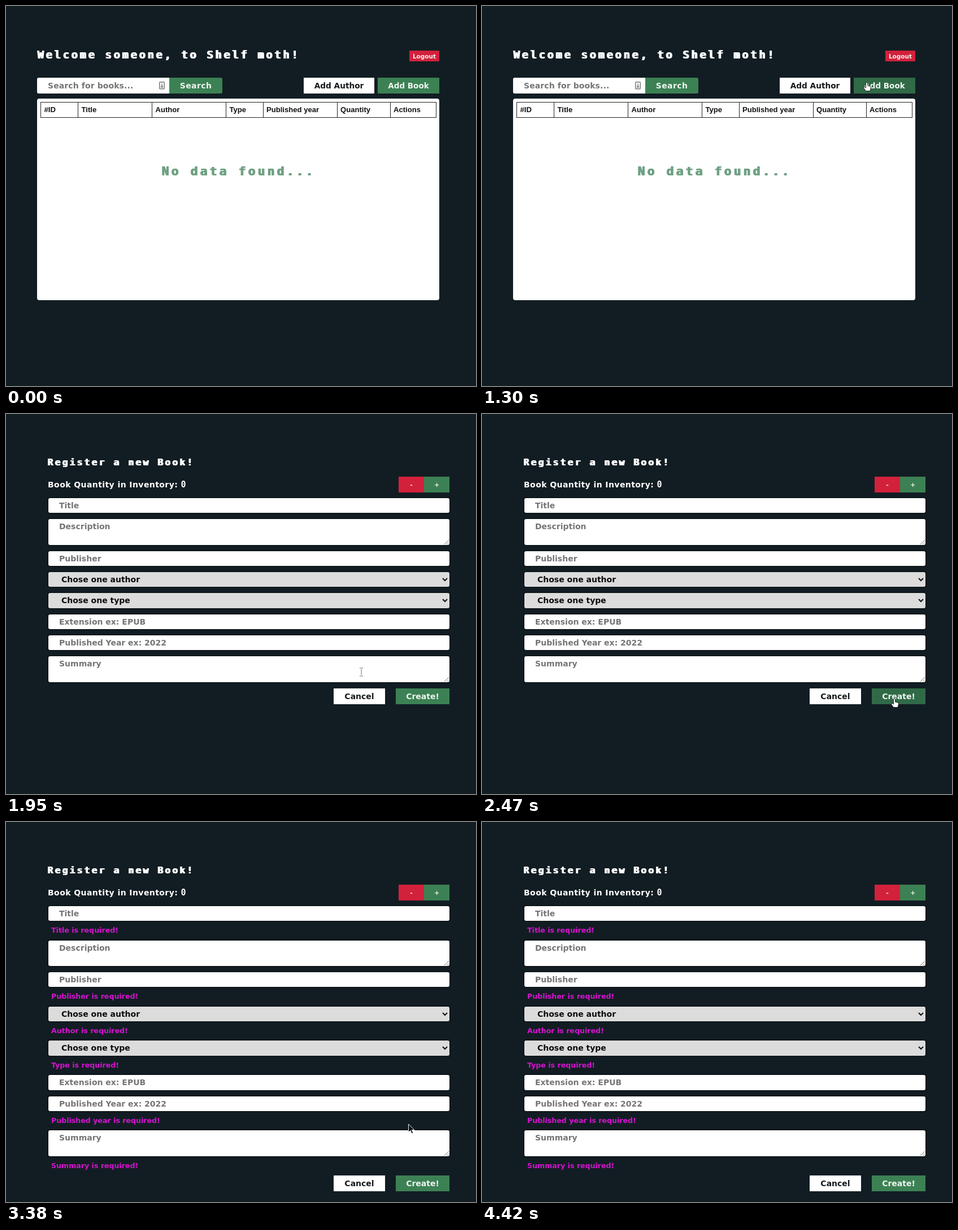
An HTML page that plays this animation: 832 by 673 pixels, repeating every 4680 ms.

```html
<!DOCTYPE html>
<html lang="en">
<head>
<meta charset="utf-8">
<title>Book registration</title>
<style>
  * { box-sizing: border-box; }
  html, body { margin: 0; width: 100%; height: 100%; overflow: hidden; background: #121d23; }
  body { font: bold 14px "DejaVu Sans", sans-serif; color: #fff; white-space: nowrap; }
  #stage { position: relative; width: 832px; height: 673px; overflow: hidden; }
  [hidden] { display: none !important; }
  .abs, .btn.abs { position: absolute; }
  .view { position: absolute; inset: 0; }

  .pixel {
    position: absolute; line-height: 24px; letter-spacing: .2em;
    font-family: "DejaVu Sans Mono", monospace; text-shadow: 1px 0, 1.6px 0;
  }
  .btn {
    display: flex; align-items: center; justify-content: center;
    height: 28px; background: #3c8154; color: #eef5ef;
  }
  .btn.white { background: #fff; color: #15191c; }
  .btn.red { background: #d3213c; }
  .btn.hover { background: #306a47; }

  #search {
    left: 55px; top: 127px; width: 234px; height: 28px; padding-left: 19px; line-height: 28px;
    background: #fff; color: #757575; border-radius: 3px 0 0 3px; letter-spacing: .1px;
  }
  #panel { left: 55px; top: 164px; width: 712px; height: 357px; background: #fff; border-radius: 4px; }
  #head {
    left: 61px; top: 170px; height: 28px; display: flex; border: solid #222; border-width: 1px 0 1px 1px;
    font: bold 13.1px/26px "Liberation Sans", Arial, sans-serif; color: #111;
  }
  #head span { padding-left: 5.5px; border-right: 1px solid #222; }

  #rows { left: 75px; top: 149px; width: 710px; }
  .row {
    position: relative; width: 709.5px; height: 26.4px; margin-bottom: 10.95px;
    padding-left: 19px; line-height: 26.4px;
    background: #fff; color: #757575; border-radius: 3px; box-shadow: 0 0 2px 1px #090f12;
  }
  .area { height: 45.4px; }
  .pick { background: #dcdcdc; color: #0c0c0c; padding-left: 23px; }
  .row svg { position: absolute; fill: none; stroke: #111; }
  .err { height: 23.4px; padding-left: 5px; font-size: 12.6px; line-height: 12px; color: #d512d0; }
  #foot { position: relative; display: flex; justify-content: flex-end; gap: 19px; z-index: 2; }
  #cancel { width: 91px; }
  #create { width: 95px; }
  #create.loading { width: 65px; }
  .load { width: 28px; height: 10px; background: linear-gradient(#6f9fc2, #6f9fc2) no-repeat #111d23; background-size: 9px 10px; }
  #veil { left: 75px; top: 80px; width: 748px; height: 478px; background: rgba(8, 62, 36, .17); }
  #cursor { left: 0; top: 0; overflow: visible; z-index: 3; }
</style>
</head>
<body>
<div id="stage">
  <div class="view" id="list">
    <div class="pixel" style="left:55px;top:75px;font-size:18.7px">Welcome someone, to Shelf moth!</div>
    <div class="btn red abs" style="left:714px;top:79px;width:53px;height:19px;font-size:10.5px;border-radius:1px">Logout</div>
    <div class="abs" id="search">Search for books...
      <svg class="abs" style="left:216px;top:7px" width="10" height="14" fill="none" stroke="#777">
        <rect x=".75" y=".75" width="8.5" height="12" rx="1" stroke-width="1.5"/>
        <path d="M5 3.5v3M3 8h4M3 10h4" stroke-width="1.5"/>
      </svg>
    </div>
    <div class="btn abs" style="left:289px;top:127px;width:94px;letter-spacing:.4px;border-radius:0 3px 3px 0">Search</div>
    <div class="btn white abs" style="left:527px;top:127px;width:125px;font-size:13.7px">Add Author</div>
    <div class="btn abs" id="add" style="left:658px;top:127px;width:109px;font-size:13.5px">Add Book</div>
    <div class="abs" id="panel"></div>
    <div class="abs" id="head"></div>
    <div class="pixel" style="left:275px;top:281px;font-size:21.2px;color:#70a183">No data found...</div>
  </div>

  <div class="view" id="form" hidden>
    <div class="pixel" style="left:73px;top:74px;font-size:16.2px">Register a new Book!</div>
    <div class="abs" style="left:74px;top:116px;line-height:19px;letter-spacing:.42px">Book Quantity in Inventory: <span style="font-family:'DejaVu Sans Mono',monospace;font-size:15px">0</span></div>
    <div class="btn red abs" style="left:695px;top:111px;width:45px;font-size:11px">-</div>
    <div class="btn abs" style="left:740px;top:111px;width:45px;font-size:11px">+</div>
    <div class="abs" id="rows"></div>
    <div class="abs load busy" style="left:434px;top:315px"></div>
    <div class="abs busy" id="veil"></div>
  </div>

  <svg class="abs" id="cursor" width="20" height="24">
    <path id="arrow" d="M0 0V14.5L3.4 11.4 5.8 16.8 8.2 15.7 5.8 10.5H10.4Z" fill="#111" stroke="#eee"/>
    <path id="hand" d="M-1.5 1Q0-1 1.5 1V6L6 7Q8 7.5 7.5 10L6 15.5H-1.5L-5.5 10Q-6 8-4 8.3L-1.5 10Z" fill="#fff" stroke="#222"/>
    <path id="beam" d="M-3-7.5H-1L0-6.5 1-7.5H3M-3 7.5H-1L0 6.5 1 7.5H3M0-6.5V6.5" fill="none" stroke="#777"/>
  </svg>
</div>

<script>
const $ = id => document.getElementById(id);
const TICK = 130, LOOP = 4680;

const columns = [["#ID", 66], ["Title", 131], ["Author", 131], ["Type", 65.5], ["Published year", 131], ["Quantity", 94], ["Actions", 81.5]];
$("head").innerHTML = columns.map(([name, w]) => `<span style="width:${w}px">${name}</span>`).join("");

// kind, label, required name
const fields = [
  ["", "Title", "Title"],
  ["area", "Description"],
  ["", "Publisher", "Publisher"],
  ["pick", "Chose one author", "Author"],
  ["pick", "Chose one type", "Type"],
  ["", "Extension ex: EPUB"],
  ["", "Published Year ex: 2022", "Published year"],
  ["area", "Summary", "Summary"]
];
const extras = {
  area: `<svg style="right:1px;bottom:1px;stroke:#777" width="8" height="8"><path d="M0 8 8 0M4.5 8 8 4.5"/></svg>`,
  pick: `<svg style="right:3px;top:10px" width="10" height="7"><path d="M1 1 5 5 9 1" stroke-width="2"/></svg>`
};
const stepper = `<svg id="stepper" style="left:677px;top:5px" width="14" height="17">
  <rect width="14" height="17" fill="#eee" stroke="none"/>
  <path d="M3.5 7 7 3.5 10.5 7ZM3.5 10 7 13.5 10.5 10Z" fill="#444" stroke="none"/></svg>`;
$("rows").innerHTML = fields.map(([kind, label, need]) =>
  `<div class="row ${kind}">${label}${extras[kind] || ""}${need === "Published year" ? stepper : ""}</div>` +
  (need ? `<div class="err">${need} is required!</div>` : "")
).join("") +
  `<div id="foot"><div class="btn white" id="cancel">Cancel</div><div class="btn" id="create">
  <span id="label">Create!</span><div class="load busy"></div></div></div>`;

// tick, cursor shape, x, y
const path = [
  [2, "arrow", 600, 642], [4, "arrow", 640, 440], [6, "arrow", 668, 215],
  [7, "hand", 677, 145], [9, "hand", 681, 135], [10, "hand", 681, 135], [11, "arrow", 674, 139],
  [13, "beam", 655, 255], [15, "beam", 629, 457], [16, "arrow", 668, 480],
  [17, "hand", 705, 496], [19, "hand", 730, 504], [23, "hand", 730, 504], [24, "beam", 730, 505],
  [25, "arrow", 725, 518], [27, "beam", 700, 552], [30, "beam", 661, 575],
  [31, "arrow", 654, 605], [32, "hand", 645, 638], [33, "arrow", 638, 657], [34, "", 630, 680]
];

function moveCursor(n) {
  const next = path.findIndex(p => p[0] > n);
  $("cursor").style.display = next > 0 ? "" : "none";
  if (next < 1) return;
  const [t0, shape, x0, y0] = path[next - 1], [t1, , x1, y1] = path[next];
  const k = (n - t0) / (t1 - t0);
  $("cursor").style.transform = `translate(${x0 + (x1 - x0) * k}px, ${y0 + (y1 - y0) * k}px)`;
  for (const id of ["arrow", "hand", "beam"]) $(id).style.display = id === shape ? "" : "none";
}

const each = (css, fn) => document.querySelectorAll(css).forEach(fn);

function draw(n) {
  const within = (a, b) => n >= a && n < b;
  const busy = within(11, 13);
  $("list").hidden = n >= 11;
  $("form").hidden = n < 11;
  $("add").classList.toggle("hover", within(7, 11));
  $("create").classList.toggle("hover", within(17, 24));
  $("create").classList.toggle("loading", busy);
  $("label").hidden = busy;
  each(".busy", el => el.hidden = !busy);
  each(".load", el => el.style.backgroundPosition = n % 2 ? "0 0" : "10px 0");
  each(".err", el => el.hidden = n < 23);
  $("stepper").style.display = within(23, 25) ? "" : "none";
  moveCursor(n);
}

let last = -1;
function frame() {
  const n = Math.floor(performance.now() % LOOP / TICK);
  if (n !== last) draw(last = n);
  requestAnimationFrame(frame);
}
frame();
</script>
</body>
</html>
```
